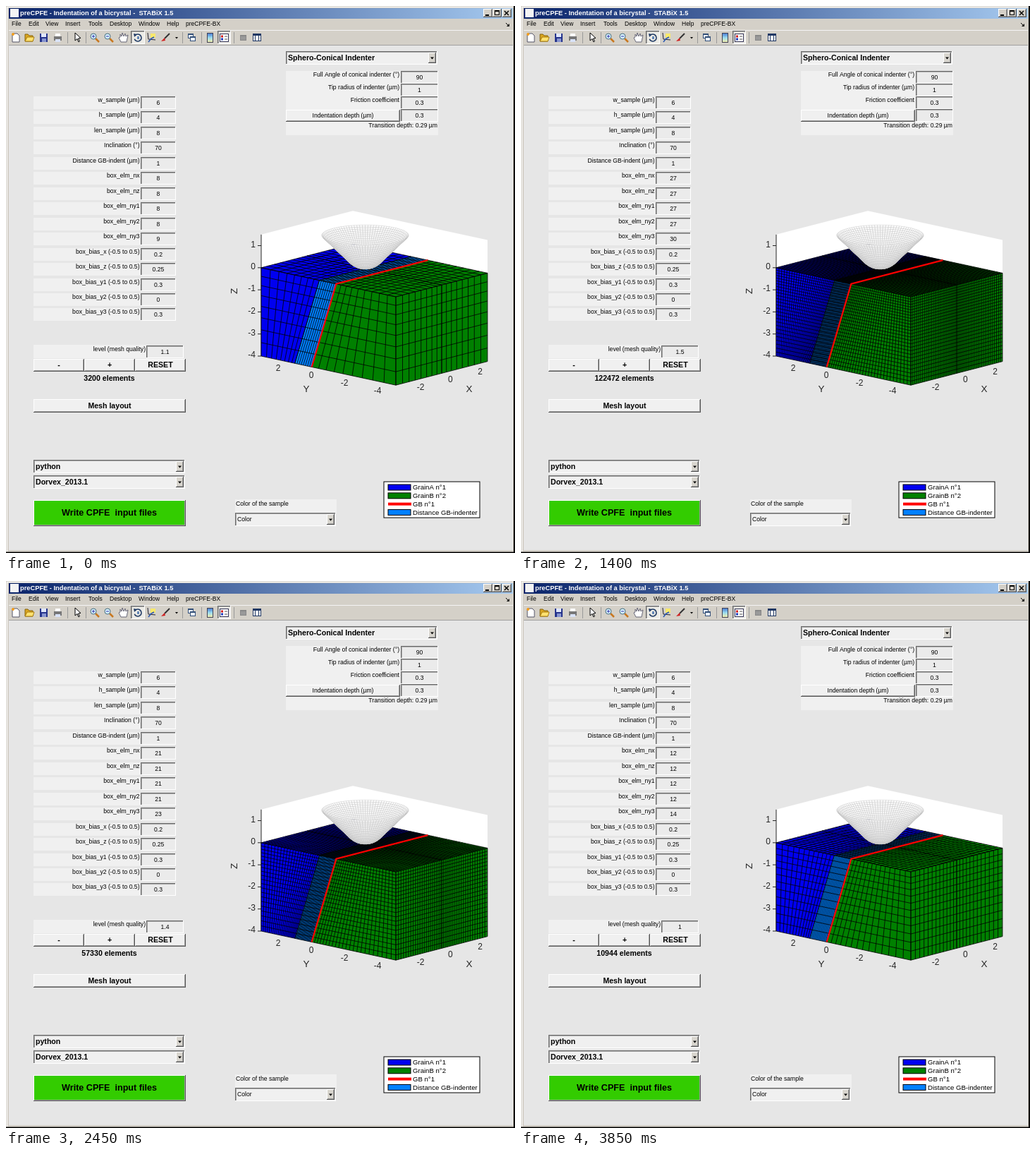
Animation of 722x775 px, one loop 4200 ms. Source, as an HTML page with a canvas:

```html
<!DOCTYPE html>
<html lang="en">
<head>
<meta charset="utf-8">
<title>Indentation of a bicrystal</title>
<style>
html, body { margin: 0; width: 100%; height: 100%; overflow: hidden; background: #e6e6e6; }
canvas { display: block; }
</style>
</head>
<body>
<canvas id="stage" width="722" height="775"></canvas>
<script>
const ctx = document.getElementById('stage').getContext('2d');
const STEP_MS = 350;
const LEVELS = [1.1, 1.2, 1.3, 1.4, 1.5, 1.6, 1.5, 1.4, 1.3, 1.2, 1.1, 1];

// Each "+" multiplies the element counts by the new level, each "-" divides them.
const states = [];
LEVELS.forEach((level, i) => {
  const prev = states[i - 1];
  const scale = i === 0 ? 1 : level > prev.level ? level : 1 / level;
  const n = prev ? Math.round(prev.n * scale) : 8;
  const ny3 = prev ? Math.round(prev.ny3 * scale) : 9;
  states.push({ level, n, ny3, total: 2 * n * n * (2 * n + ny3) });
});

function rect(x, y, w, h, fill) {
  ctx.fillStyle = fill;
  ctx.fillRect(x, y, w, h);
}

function path(points, { fill, stroke, width = 1, close = false }) {
  ctx.beginPath();
  points.forEach(([x, y]) => ctx.lineTo(x, y));
  if (close) ctx.closePath();
  if (fill) { ctx.fillStyle = fill; ctx.fill(); }
  if (stroke) { ctx.strokeStyle = stroke; ctx.lineWidth = width; ctx.stroke(); }
}

function disc(x, y, r, fill, stroke) {
  ctx.beginPath();
  ctx.arc(x, y, r, 0, 7);
  ctx.fillStyle = fill;
  ctx.fill();
  ctx.strokeStyle = stroke;
  ctx.lineWidth = 1;
  ctx.stroke();
}

function text(value, x, y, { size = 8.65, align = 'left', bold = false, color = '#000' } = {}) {
  ctx.font = `${bold ? 'bold ' : ''}${size}px "Liberation Sans", Arial, sans-serif`;
  ctx.textAlign = align;
  ctx.textBaseline = 'middle';
  ctx.fillStyle = color;
  ctx.fillText(value, x, y);
}

const strong = (value, x, y, align = 'center', size = 10.6) =>
  text(value, x, y, { size, align, bold: true });

function bevel(x, y, w, h, fill, sunken) {
  const [light, dark] = sunken ? ['#6a6a6a', '#fff'] : ['#fff', '#555'];
  rect(x, y, w, h, fill);
  rect(x, y, w, 1, light);
  rect(x, y, 1, h, light);
  rect(x, y + h - 1, w, 1, dark);
  rect(x + w - 1, y, 1, h, dark);
  if (sunken) {
    rect(x + 1, y + 1, w - 2, 1, '#a8a8a8');
    rect(x + 1, y + 1, 1, h - 2, '#a8a8a8');
  } else {
    rect(x + 1, y + h - 2, w - 2, 1, '#a0a0a0');
    rect(x + w - 2, y + 1, 1, h - 2, '#a0a0a0');
  }
}

function field(value, x, y, w) {
  bevel(x, y, w, 18, '#ebebeb', true);
  text(value, x + w / 2, y + 9.5, { align: 'center' });
}

function button(label, x, y, w, h, size) {
  bevel(x, y, w, h, '#f0f0f0', false);
  strong(label, x + w / 2, y + h / 2 + 0.5, 'center', size);
}

function dropdown(label, x, y, w, bold) {
  bevel(x, y, w, 19, '#f0f0f0', true);
  bevel(x + w - 13, y + 2, 11, 15, '#d8d5ce', false);
  const ax = x + w - 7.5, ay = y + 8.5;
  path([[ax - 2.5, ay], [ax + 2.5, ay], [ax, ay + 3]], { fill: '#000' });
  if (bold) strong(label, x + 3, y + 10, 'left');
  else text(label, x + 3, y + 10);
}

function drawToolbar() {
  rect(4, 34, 715, 1, '#f4f4f4');
  rect(4, 55, 715, 1, '#a0a0a0');
  [87, 113, 250, 277, 323].forEach(x => rect(x, 37, 1, 16, '#999'));
  [[177, 20], [300, 19]].forEach(([x, w]) => bevel(x, 35, w, 19, '#ecebe6', true));

  // New, open, save, print
  path([[9, 39], [16, 39], [19, 42], [19, 51], [9, 51]], { fill: '#fff', stroke: '#556', close: true });
  disc(10, 40, 1.5, '#f5a020', '#f5a020');
  path([[27, 50], [27, 40], [31, 40], [33, 42], [38, 42], [38, 50]], { fill: '#d9a520', stroke: '#86650c', close: true });
  path([[27, 50], [30, 44], [40, 44], [38, 50]], { fill: '#ffe270', stroke: '#a87c10', close: true });
  rect(48, 39, 11, 12, '#26348c');
  rect(50, 39, 7, 5, '#dfe6fa');
  rect(51, 46, 6, 5, '#8795d0');
  rect(70, 39, 7, 5, '#fff');
  rect(68, 43, 11, 6, '#777');
  rect(70, 47, 7, 4, '#d8e2f8');

  path([[98, 38], [98, 49], [101, 46.5], [103, 51], [104.5, 50], [102.5, 46], [106, 45.5]],
    { fill: '#fff', stroke: '#000', close: true });

  // Zoom tools
  [124, 144].forEach((x, i) => {
    path([[x + 3, 46], [x + 8, 51]], { stroke: '#c87820', width: 2.5 });
    disc(x, 43, 4, '#d6f0ff', '#4a7080');
    rect(x - 2, 42.5, 4, 1, '#33a');
    if (!i) rect(x - 0.5, 41, 1, 4, '#33a');
  });

  path([[163, 51], [160, 45], [162, 44], [162, 40], [164, 43], [165, 38], [167, 43], [169, 39],
    [170, 43], [173, 41], [171, 51]], { fill: '#fff', stroke: '#667', close: true });

  // Rotate, data cursor, brush
  ctx.beginPath();
  ctx.arc(187, 45, 5, -2.5, 2.8);
  ctx.strokeStyle = '#223c66';
  ctx.lineWidth = 1.6;
  ctx.stroke();
  path([[181, 39], [186, 40], [182, 44]], { fill: '#223c66' });
  rect(186, 43, 3, 4, '#6488b8');
  rect(205, 39, 7, 6, '#f8e96c');
  path([[201, 38], [202, 47], [212, 48]], { stroke: '#223' });
  path([[202, 51], [206, 46], [210, 44]], { stroke: '#2856b0', width: 1.5 });
  path([[232, 39], [225, 46]], { stroke: '#333', width: 2 });
  path([[225, 45], [220, 50], [226, 49]], { fill: '#d02020' });
  path([[240, 44], [244, 44], [242, 46.5]], { fill: '#000' });

  // Link, colorbar, legend, panels
  [[258, 39], [261, 43]].forEach(([x, y]) => {
    rect(x, y, 8, 7, '#345078');
    rect(x + 1, y + 2, 6, 4, '#eaf0fa');
  });
  const bar = ctx.createLinearGradient(0, 38, 0, 52);
  bar.addColorStop(0, '#3f70d0');
  bar.addColorStop(0.5, '#9adcf0');
  bar.addColorStop(1, '#fff0a0');
  rect(285, 38, 9, 14, '#445');
  rect(286, 39, 7, 12, bar);
  rect(303, 39, 13, 12, '#335');
  rect(304, 40, 11, 10, '#fff');
  ['#d02020', '#2040c0'].forEach((c, i) => {
    rect(305, 41.5 + i * 4, 3, 3, c);
    rect(310, 42.5 + i * 4, 4, 1, '#555');
  });
  rect(332, 41, 9, 8, '#888');
  rect(333, 43, 7, 5, '#999');
  rect(350, 39, 12, 11, '#203864');
  rect(351, 42, 10, 7, '#f4f4f4');
  rect(353, 42, 1, 7, '#203864');
  rect(358, 42, 1, 7, '#203864');
}

function drawWindow() {
  rect(0, 0, 722, 775, '#d4d0c8');
  rect(1, 1, 719, 1, '#fff');
  rect(1, 1, 1, 772, '#fff');
  rect(4, 56, 715, 715, '#e6e6e6');
  rect(720, 0, 2, 775, '#000');
  rect(0, 773.5, 722, 1.5, '#000');

  const bar = ctx.createLinearGradient(4, 0, 718, 0);
  bar.addColorStop(0, '#0a246a');
  bar.addColorStop(1, '#a6caf0');
  rect(4, 3, 715, 15, bar);
  rect(6, 4, 12, 12, '#f4f4f4');
  text('preCPFE - Indentation of a bicrystal -  STABiX 1.5', 20, 10.5, { size: 9.3, bold: true, color: '#fff' });
  [677, 690, 704].forEach(x => bevel(x, 4, 13, 12, '#d4d0c8', false));
  rect(680, 12, 5, 2, '#000');
  rect(693, 6, 7, 7, '#000');
  rect(694, 8, 5, 4, '#d4d0c8');
  path([[707, 7], [713, 13]], { stroke: '#000', width: 1.5 });
  path([[713, 7], [707, 13]], { stroke: '#000', width: 1.5 });

  const menu = { File: 8, Edit: 32, View: 56, Insert: 84, Tools: 117, Desktop: 147, Window: 188, Help: 228, 'preCPFE-BX': 255 };
  for (const [label, x] of Object.entries(menu)) text(label, x, 26, { size: 8.5 });
  path([[709, 24], [713, 28]], { stroke: '#000' });
  path([[714, 25], [714, 29], [710, 29]], { fill: '#000' });
  drawToolbar();
}

function drawForm({ level, n, ny3, total }) {
  const rows = [
    ['w_sample (µm)', 6], ['h_sample (µm)', 4], ['len_sample (µm)', 8],
    ['Inclination (°)', 70], ['Distance GB-indent (µm)', 1],
    ['box_elm_nx', n], ['box_elm_nz', n], ['box_elm_ny1', n], ['box_elm_ny2', n], ['box_elm_ny3', ny3],
    ['box_bias_x (-0.5 to 0.5)', 0.2], ['box_bias_z (-0.5 to 0.5)', 0.25],
    ['box_bias_y1 (-0.5 to 0.5)', 0.3], ['box_bias_y2 (-0.5 to 0.5)', 0], ['box_bias_y3 (-0.5 to 0.5)', 0.3]
  ];
  rows.forEach(([label, value], i) => {
    const y = Math.round(128 + i * 21.46);
    rect(39, y, 152, 18, '#f0f0f0');
    text(label, 189.5, y + 6, { align: 'right' });
    field(value, 191, y, 50);
  });

  rect(39, 480, 161, 19, '#f0f0f0');
  text('level (mesh quality)', 198, 487, { align: 'right' });
  field(level, 199, 481, 53);
  ['-', '+', 'RESET'].forEach((label, i) => button(label, 39 + i * 72, 500, 72, 18));
  strong(`${total} elements`, 146.5, 528);
  button('Mesh layout', 39, 557, 216, 19);
  dropdown('python', 39, 643, 215, true);
  dropdown('Dorvex_2013.1', 39, 665, 215, true);
  bevel(39, 700, 216, 37, '#33cc00', false);
  strong('Write CPFE  input files', 146.5, 718.5, 'center', 12.6);

  dropdown('Sphero-Conical Indenter', 397, 64, 215, true);
  rect(397, 92, 216, 91, '#f0f0f0');
  const indenter = [
    ['Full Angle of conical indenter (°)', 90], ['Tip radius of indenter (µm)', 1],
    ['Friction coefficient', 0.3], ['', 0.3]
  ];
  indenter.forEach(([label, value], i) => {
    text(label, 558, 98 + i * 18, { align: 'right' });
    field(value, 560, 92 + i * 18, 53);
  });
  bevel(397, 147, 162, 17, '#f0f0f0', false);
  text('Indentation depth (µm)', 478, 156, { align: 'center' });
  text('Transition depth: 0.29 µm', 612, 169.5, { align: 'right' });

  rect(325, 699, 144, 19, '#f0f0f0');
  text('Color of the sample', 326, 706);
  dropdown('Color', 325, 718, 143, false);
}

const BLUE = '#0000f0', GREEN = '#008000', SKY = '#0080ff', RED = '#ff0000';

function drawLegend() {
  rect(535.5, 673.5, 137, 52, '#000');
  rect(536.5, 674.5, 135, 50, '#fff');
  [['GrainA n°1', BLUE], ['GrainB n°2', GREEN], ['GB n°1', RED], ['Distance GB-indenter', SKY]].forEach(([label, color], i) => {
    const y = 682 + i * 11.8;
    if (color === RED) {
      rect(542, y - 2, 33, 4, color);
    } else {
      rect(541.5, y - 4.5, 33, 9, '#000');
      rect(542.5, y - 3.5, 31, 7, color);
    }
    text(label, 577, y + 0.5, { size: 9.6 });
  });
}

// Orthographic view of the sample, which spans x -3..3, y -5..3, z -4..0.
const project = (x, y, z) => [
  362 + (3 - y) * 23.87 + (x + 3) * 21.67,
  370.8 + (3 - y) * 5.15 - (x + 3) * 5.6 - z * 31.3
];

const boundary = z => -(z + 4) / Math.tan(70 * Math.PI / 180);
const biased = (i, n, bias) => { const t = i / n; return t + bias * t * (t - 1); };
const range = n => Array.from({ length: n + 1 }, (_, i) => i);

function drawAxes() {
  path([project(-3, 3, 1.5), project(3, 3, 1.5), project(3, -5, 1.5), project(3, -5, -4),
    project(-3, -5, -4), project(-3, 3, -4)], { fill: '#fff', close: true });
  const label = (value, x, y) => text(value, x, y, { size: 12, align: 'center', color: '#262626' });
  path([project(-3, 3, 1.5), project(-3, 3, -4)], { stroke: '#262626' });
  for (let z = -4; z <= 1; z++) {
    const [x, y] = project(-3, 3, z);
    path([[x - 5, y], [x, y]], { stroke: '#262626' });
    text(z, 354, y - 1, { size: 12, align: 'right', color: '#262626' });
  }
  [2, 0, -2, -4].forEach((v, i) => label(v, 386 + i * 47, 513.5 + i * 10.6));
  [-2, 0, 2].forEach((v, i) => label(v, 588 + i * 42.3, 541 - i * 11.3));
  text('Y', 426, 543, { size: 13.5, align: 'center', color: '#262626' });
  text('X', 657, 543.5, { size: 13.5, align: 'center', color: '#262626' });
  ctx.save();
  ctx.translate(324, 404);
  ctx.rotate(-Math.PI / 2);
  text('Z', 0, 0, { size: 13.5, align: 'center', color: '#262626' });
  ctx.restore();
}

function drawSample({ n, ny3 }) {
  const band = (from, to, fill) => path([
    project(-3, from(-4), -4), project(-3, from(0), 0), project(3, from(0), 0),
    project(3, to(0), 0), project(-3, to(0), 0), project(-3, to(-4), -4)
  ], { fill, close: true });
  const left = () => 3, right = () => -5, offset = z => boundary(z) + 1;
  band(left, offset, BLUE);
  band(offset, boundary, SKY);
  band(boundary, right, GREEN);
  path([project(-3, -5, -4), project(-3, -5, 0), project(3, -5, 0), project(3, -5, -4)], { fill: GREEN, close: true });

  const line = points => path(points, { stroke: '#000', width: 0.8 });
  const column = y => line([project(-3, y(-4), -4), project(-3, y(0), 0), project(3, y(0), 0)]);
  const spread = (from, to, count, bias) => range(count).forEach(i => {
    const s = biased(i, count, bias);
    column(z => from(z) + (to(z) - from(z)) * s);
  });
  spread(offset, left, n, 0.3);
  spread(offset, boundary, n, 0);
  spread(boundary, right, ny3, 0.3);
  range(n).forEach(i => {
    const dx = 3 * biased(i, n, 0.2);
    [-dx, dx].forEach(x => line([project(x, 3, 0), project(x, -5, 0), project(x, -5, -4)]));
    const z = -4 * biased(i, n, 0.25);
    line([project(-3, 3, z), project(-3, -5, z), project(3, -5, z)]);
  });

  path([project(-3, 0, -4), project(-3, boundary(0), 0), project(3, boundary(0), 0)], { stroke: RED, width: 2.2 });
}

// Spherical tip of radius 1 blending into a 45° cone.
function drawIndenter() {
  const SIDES = 96, RINGS = 26, HEIGHT = 1.5, TIP = 1 - Math.SQRT1_2;
  const [cx, cy] = project(0, boundary(0) + 1, 0);
  const profile = k => {
    const z = HEIGHT * (k / RINGS) ** 1.25;
    return [z < TIP ? Math.sqrt(2 * z - z * z) : Math.SQRT1_2 + z - TIP, z];
  };
  const point = (k, side) => {
    const [r, z] = profile(k), a = side * 2 * Math.PI / SIDES;
    return [cx + 32.2 * r * Math.cos(a), cy + 7.6 * r * Math.sin(a) - 31.3 * z];
  };
  const depth = side => Math.sin((side + 0.5) * 2 * Math.PI / SIDES);
  const sides = range(SIDES - 1).sort((a, b) => depth(a) - depth(b));
  for (const s of sides) {
    for (let k = 0; k < RINGS; k++) {
      path([point(k, s), point(k, s + 1), point(k + 1, s + 1), point(k + 1, s)],
        { fill: '#fff', stroke: '#bbb', width: 0.4, close: true });
    }
  }
}

let shown = -1;
function tick(now) {
  const step = Math.floor(now / STEP_MS) % states.length;
  if (step !== shown) {
    shown = step;
    drawWindow();
    drawForm(states[step]);
    drawLegend();
    drawAxes();
    drawSample(states[step]);
    drawIndenter();
  }
  requestAnimationFrame(tick);
}
tick(performance.now());
</script>
</body>
</html>
```
